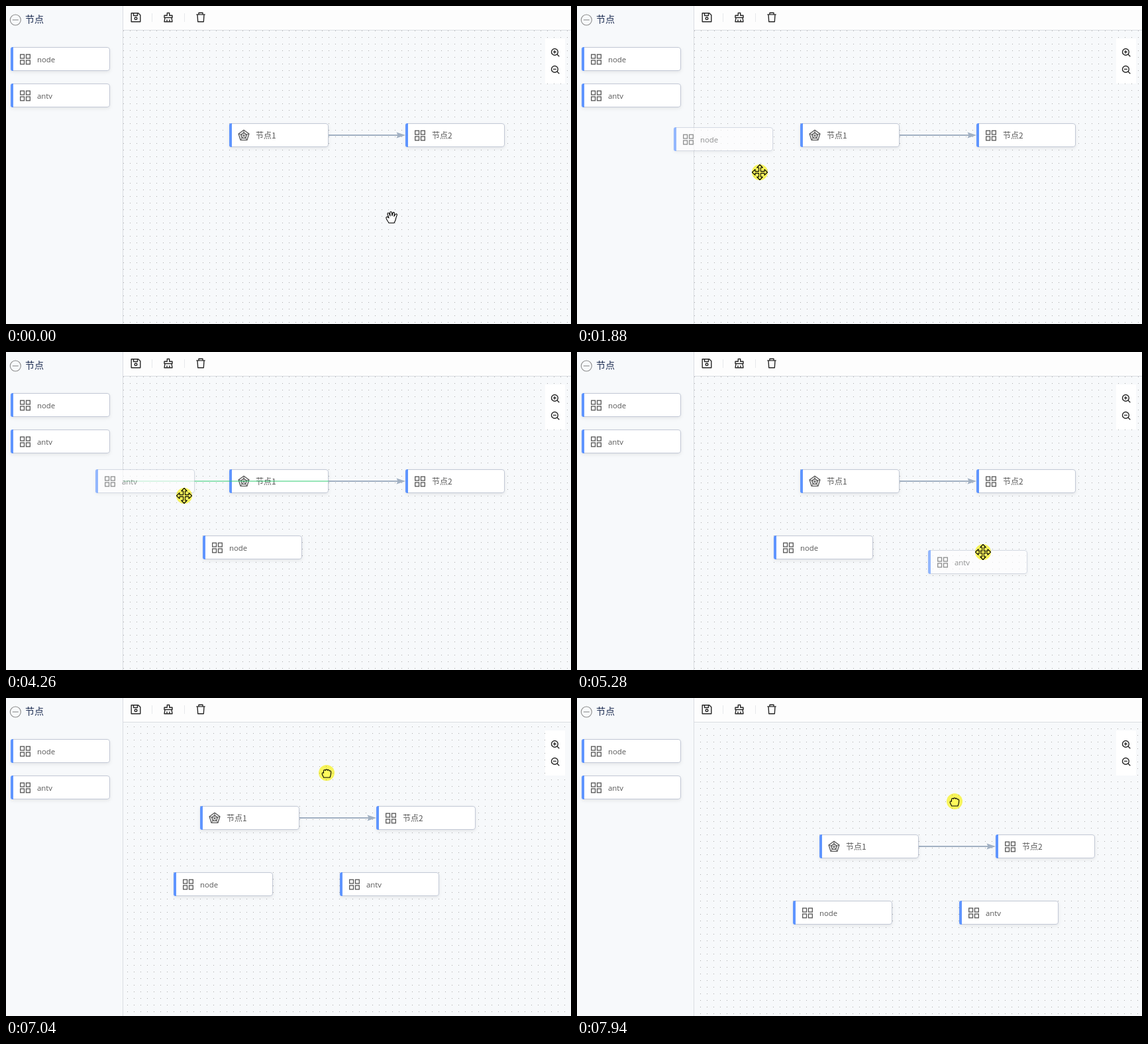
An HTML page for the animation above (8 s loop, 853x480 px).

```html
<!DOCTYPE html>
<html lang="zh">
<head>
<meta charset="utf-8">
<title>Flow editor</title>
<style>
  html, body { margin: 0; width: 100%; height: 100%; overflow: hidden; background: #f7f9fb; }
  svg { display: block; width: 100vw; height: 100vh; }
  text { font: 11.4px "Open Sans", "Noto Sans", sans-serif; fill: #595959; }
  text.cjk { font: 12px "Noto Sans CJK SC", "Noto Sans CJK JP", "Noto Sans CJK", sans-serif; }
  text.title { font-size: 14px; fill: #1f2f54; }
  .icon { fill: none; stroke: #555; stroke-width: 1.3; }
  .tool { fill: none; stroke: #262626; stroke-width: 1.4; stroke-linejoin: round; }
  .card { filter: drop-shadow(0 2px 2.5px rgba(0, 0, 0, .08)); }
  .port { fill: #fff; stroke: #5f95ff; }
  .snap { stroke: #2ecc71; }
  .cursor { fill: #fff; stroke: #000; stroke-width: 1.1; stroke-linejoin: round; }
  #press { fill: #fffa5c; mix-blend-mode: multiply; }
</style>
</head>
<body>
<svg viewBox="0 0 853 480" preserveAspectRatio="none">
  <defs>
    <pattern id="dots" width="10" height="10" patternUnits="userSpaceOnUse">
      <rect x="7" y="7" width="1" height="1" fill="#a9a9a9" shape-rendering="crispEdges"/>
    </pattern>
    <clipPath id="area"><rect x="177" y="37" width="676" height="443"/></clipPath>
    <g id="grid" class="icon">
      <rect x="14.7" y="11.2" width="5.8" height="5.8"/>
      <rect x="23.5" y="11.2" width="5.8" height="5.8"/>
      <rect x="14.7" y="20" width="5.8" height="5.8"/>
      <rect x="23.5" y="20" width="5.8" height="5.8"/>
    </g>
    <g id="radar" class="icon"></g>
    <g id="lens" class="tool" stroke-width="1.2">
      <circle cx="-.6" cy="-.6" r="4.9"/>
      <path d="M3 3 L6.3 6.3 M-3 -.6 H1.8"/>
    </g>
  </defs>

  <rect width="853" height="480" fill="#f7f9fb"/>
  <g clip-path="url(#area)">
    <g id="view">
      <rect x="-200" y="-200" width="1300" height="900" fill="url(#dots)"/>
      <path d="M487 195 H592" stroke="#a2b1c3" stroke-width="2"/>
      <path d="M603 195 L589.5 190.5 L591.5 195 L589.5 199.5 Z" fill="#a2b1c3"/>
      <g id="nodes"></g>
      <g id="ports"></g>
      <path id="snap" class="snap"/>
    </g>
  </g>

  <rect x="814" y="49" width="30" height="68" fill="#fff"/>
  <use href="#lens" x="829" y="70"/>
  <path class="tool" d="M828.4 67 V71.8"/>
  <use href="#lens" x="829" y="96"/>

  <rect x="177" width="676" height="37" fill="#fdfdfd"/>
  <path d="M177 36.5 H853 M176.5 0 V480" stroke="#dadde2"/>
  <path d="M220.5 11 V24 M269.5 11 V24" stroke="#e6e8eb"/>
  <g class="tool">
    <path d="M189.2 10.7 H199.7 L202.8 13.8 V23.8 H189.2 Z M192.5 11 V14.5 H198.5 V11"/>
    <circle cx="196" cy="18.8" r="1.8"/>
    <path d="M243.3 14.3 V10.5 H246.7 V14.3 H251 V17.5 H239 V14.3 Z M240 17.5 L239 23.8 H251 L250 17.5 M243 23.5 V20.5 M247 23.5 V20.5"/>
    <path d="M287.3 12.9 H300.7 M291 12.5 V10.3 H297 V12.5 M289 13 L289.7 23.8 H298.3 L299 13"/>
  </g>

  <g fill="none" stroke="#8c8c8c" stroke-width="1.1">
    <circle cx="14.3" cy="21" r="8"/>
    <path d="M9.8 21 H18.8"/>
  </g>
  <text class="cjk title" x="29" y="25">节点</text>
  <g id="palette"></g>
  <g id="ghosts" opacity=".65"></g>
  <g id="pointer">
    <path id="shape" class="cursor"/>
    <circle id="press" r="12"/>
  </g>
</svg>
<script>
const LOOP = 8000;
const $ = id => document.getElementById(id);
const NS = 'http://www.w3.org/2000/svg';

function add(parent, tag, attrs, text) {
  const el = document.createElementNS(NS, tag);
  for (const k in attrs) el.setAttribute(k, attrs[k]);
  if (text) el.textContent = text;
  parent.appendChild(el);
  return el;
}
const place = (el, [x, y]) => el.setAttribute('transform', `translate(${x} ${y})`);
const show = (el, on) => el.setAttribute('visibility', on ? 'visible' : 'hidden');
const within = (t, spans) => spans.some(([a, b]) => t >= a && t < b);

function card(parent, label, x, y, icon = 'grid') {
  const g = add(parent, 'g', { class: 'card' });
  place(g, [x, y]);
  add(g, 'rect', { x: .5, y: .5, width: 149, height: 35, rx: 3.5, fill: '#fff', stroke: '#c2c8d5' });
  add(g, 'path', { d: 'M4 0 H3 Q0 0 0 3 V33 Q0 36 3 36 H4 Z', fill: '#5f95ff' });
  add(g, 'use', { href: '#' + icon });
  const cjk = label > '~';
  add(g, 'text', { x: 40, y: cjk ? 22.8 : 22.6, class: cjk ? 'cjk' : '' }, label);
  return g;
}

// Pentagon rings with spokes
const ring = r => [0, 1, 2, 3, 4].map(i => {
  const a = (i * 72 - 90) * Math.PI / 180;
  return [22 + r * Math.cos(a), 18.6 + r * Math.sin(a)].map(v => v.toFixed(1));
});
for (const r of [8.3, 4.6]) add($('radar'), 'path', { d: `M${ring(r).join('L')}Z` });
add($('radar'), 'path', { d: ring(8).map(p => `M22 18.6L${p}`).join(''), 'stroke-width': .9 });

card($('palette'), 'node', 7, 62);
card($('palette'), 'antv', 7, 117);
card($('nodes'), '节点1', 337, 177, 'radar');
card($('nodes'), '节点2', 603, 177);

const drags = [
  { node: card($('nodes'), 'node', 297, 277), ghost: card($('ghosts'), 'node', 0, 0),
    from: 1340, to: 2710,
    path: [[1340, 5, 64], [1550, 10, 72], [1740, 62, 122], [1880, 146, 183], [1940, 146, 183],
           [2020, 242, 280], [2090, 282, 299], [2300, 293, 290], [2510, 295, 275]] },
  { node: card($('nodes'), 'antv', 548, 277), ghost: card($('ghosts'), 'antv', 0, 0),
    from: 4190, to: 5550,
    path: [[4190, 30, 120], [4260, 135, 177], [4325, 135, 177], [4400, 380, 270], [4540, 593, 325],
           [4740, 593, 325], [5070, 500, 313], [5280, 530, 299], [5345, 530, 299],
           [5400, 542, 277], [5460, 545, 277], [5490, 546, 279]] }
];

const pointerPath = [
  [0, 582, 319], [69, 582, 319], [70, 581, 318], [470, 581, 318], [680, 505, 298],
  [950, 225, 182], [1210, 76, 88], [1340, 76, 88], [1550, 92, 102], [1740, 180, 175],
  [1880, 276, 251], [1940, 276, 251], [2020, 358, 301], [2090, 379, 320], [2300, 378, 303],
  [2510, 375, 293], [3100, 375, 293], [3300, 280, 232], [3650, 112, 124], [3790, 106, 130],
  [3859, 106, 130], [3860, 102, 132], [4130, 102, 132], [4260, 269, 217], [4325, 269, 217],
  [4540, 672, 345], [4740, 672, 345], [5070, 577, 325], [5280, 613, 302], [5345, 613, 302],
  [5490, 623, 295], [6230, 623, 295], [6570, 541, 127], [6700, 541, 127], [6970, 498, 114],
  [7040, 484, 113], [7110, 484, 113], [7300, 450, 125], [7550, 500, 168], [7800, 566, 159],
  [7870, 569, 157], [7940, 570, 156]
];
const panPath = [
  [6700, 0, 0], [6970, -30, -12], [7040, -44, -14], [7110, -44, -14], [7320, -90, -3],
  [7570, -41, 40], [7800, 26, 32], [7870, 28, 30], [7940, 29, 29]
];

// Four arrows turned about the centre
const arm = [[-1.4, -1.4], [-1.4, -7], [-4.3, -7], [0, -11.5], [4.3, -7], [1.4, -7]];
const turn = ([x, y], q) => [[x, y], [-y, x], [-x, -y], [y, -x]][q];
const shapes = {
  arrow: 'M0 0 V16 L3.7 12.5 L6 18 L8.4 17 L6 11.6 H11.5 Z',
  move: `M${[0, 1, 2, 3].flatMap(q => arm.map(p => turn(p, q))).join('L')}Z`,
  open: 'M-4 8.5C-5 6-9 2-8 0C-7-1.5-5-.5-4 1L-6-5C-6.3-7-4-7.5-3.3-5.5L-2-2L-2.3-7' +
        'C-2.3-9 .3-9 .5-7L.9-2.5L2-6.5C2.6-8.3 4.8-7.7 4.5-5.8L3.8-1.5L6-4.5' +
        'C7.2-6 9-5 8.2-3.3C7-.5 6.5 2 6 4C5.5 6 4.5 7 4 8.5Z',
  grab: 'M-4.5 7C-5 5-7 3-6.8 1C-6.7-.5-5-.5-4.5.3V-2.5C-4.5-4.8-2.3-5-1.8-3.6' +
        'C-1.3-5.6 1-5.6 1.4-3.8C2-5.2 4-4.8 4.2-2.9C5.2-3.7 6.8-2.8 6.7-1.1C6.7 3 6 4 5 7Z'
};
const shapeAt = [
  [0, 'open'], [1010, 'arrow'], [1340, 'move'], [3170, 'open'], [3510, 'arrow'],
  [4190, 'move'], [6300, 'open'], [6600, 'grab']
];
const pressed = [[1280, 2710], [4130, 5550], [6600, LOOP]];
const portTimes = [[3040, 3170], [6230, 6300]];
const snaps = [
  { span: [4250, 4330], y: 195, x1: 177, x2: () => 487 },
  { span: [5390, 5470], y: 295, x1: 297, x2: x => x + 150 }
];

const portNodes = [[337, 177], [603, 177], [297, 277], [548, 277]].map(([x, y]) => {
  const g = add($('ports'), 'g', {});
  for (const [dx, dy] of [[75, 0], [150, 18], [75, 36], [0, 18]])
    add(g, 'circle', { class: 'port', cx: x + dx, cy: y + dy, r: 4 });
  return g;
});

function at(path, t) {
  const i = path.findIndex(k => k[0] > t);
  if (i === 0) return path[0].slice(1);
  if (i < 0) return path[path.length - 1].slice(1);
  const [a, b] = [path[i - 1], path[i]];
  const u = (t - a[0]) / (b[0] - a[0]);
  return [1, 2].map(n => Math.round(a[n] + (b[n] - a[n]) * u));
}

function draw(t) {
  for (const d of drags) {
    show(d.ghost, t >= d.from && t < d.to);
    show(d.node, t >= d.to);
    place(d.ghost, at(d.path, t));
  }
  place($('view'), at(panPath, t));

  const hover = within(t, portTimes);
  portNodes.forEach((g, i) => show(g, hover && (i < 3 || t > drags[1].to)));

  const s = snaps.find(s => within(t, [s.span]));
  show($('snap'), s);
  if (s) $('snap').setAttribute('d', `M${s.x1} ${s.y}H${s.x2(at(drags[1].path, t)[0])}`);

  place($('pointer'), at(pointerPath, t));
  $('shape').setAttribute('d', shapes[shapeAt.filter(k => k[0] <= t).pop()[1]]);
  show($('press'), within(t, pressed));
}

const start = performance.now();
function tick() {
  draw((performance.now() - start) % LOOP);
  requestAnimationFrame(tick);
}
tick();
</script>
</body>
</html>
```
